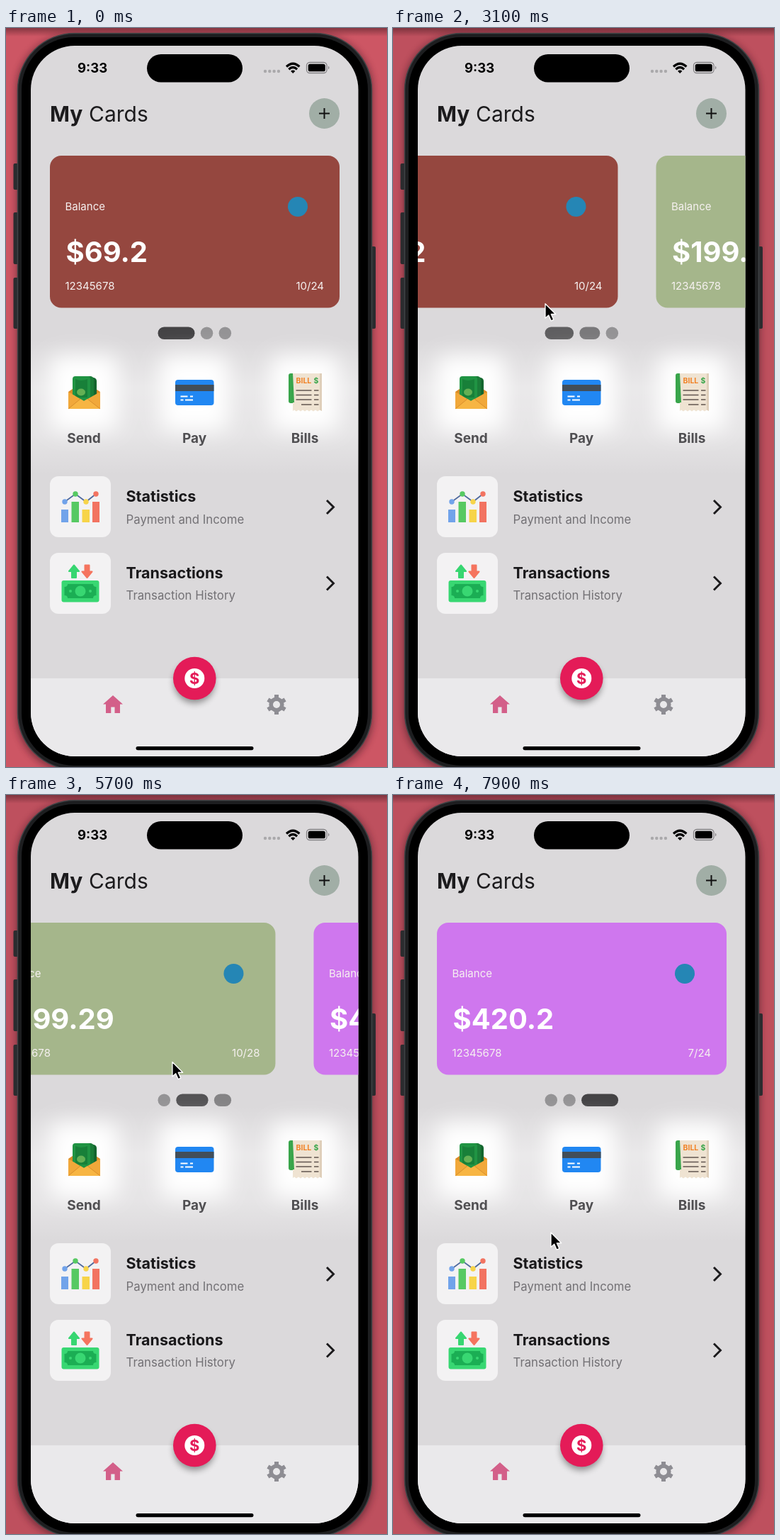
Write an HTML page that moves like this. It is 538 px wide and 1042 px high and loops after 8 s.

```html
<!DOCTYPE html>
<html lang="en">
<head>
<meta charset="utf-8">
<title>My Cards</title>
<style>
  html, body { margin: 0; width: 100%; height: 100%; overflow: hidden; background: #cd5664; }
  svg { display: block; width: 538px; height: 1042px; font-family: Inter, Roboto, sans-serif; }
  .bold { font-weight: 700; }
  .mid { text-anchor: middle; }
  .end { text-anchor: end; }
</style>
</head>
<body>
<svg viewBox="0 0 538 1042">
  <defs>
    <clipPath id="screen"><rect x="35" y="25" width="462.5" height="1002" rx="62"/></clipPath>
    <filter id="glow" x="-60%" y="-60%" width="220%" height="220%"><feGaussianBlur stdDeviation="15"/></filter>
    <filter id="soft" x="-30%" y="-30%" width="160%" height="160%"><feGaussianBlur stdDeviation="5"/></filter>
    <linearGradient id="band" x2="0" y2="1">
      <stop stop-color="#fff" stop-opacity="0"/><stop offset=".35" stop-color="#fff" stop-opacity=".4"/>
      <stop offset=".7" stop-color="#fff" stop-opacity=".3"/><stop offset="1" stop-color="#fff" stop-opacity="0"/>
    </linearGradient>
    <linearGradient id="edge" x2="0" y2="1">
      <stop stop-color="#4a1c24" stop-opacity=".55"/><stop offset="1" stop-color="#4a1c24" stop-opacity="0"/>
    </linearGradient>
  </defs>

  <rect width="538" height="1042" fill="#cd5664"/>
  <rect id="shade" width="538" height="1042" fill="#3a2028"/>
  <rect width="538" height="12" fill="url(#edge)"/>
  <rect x="14" y="9" width="505" height="1040" rx="78" fill="#401820" opacity=".5" filter="url(#soft)"/>

  <g fill="#2b2c2f">
    <rect x="10.500" y="191" width="8" height="37" rx="2"/>
    <rect x="10.500" y="260" width="8" height="73" rx="2"/>
    <rect x="10.500" y="352" width="8" height="72" rx="2"/>
    <rect x="514" y="308" width="8" height="116" rx="2"/>
  </g>
  <rect x="16.500" y="7.500" width="500" height="1038" rx="80" fill="#1d1e20" stroke="#404346" stroke-width="1.500"/>
  <rect x="22" y="13" width="489" height="1027" rx="74"/>

  <g clip-path="url(#screen)">
    <rect x="35" y="25" width="463" height="1002" fill="#dbd9db"/>

    <text class="bold" x="101" y="63" font-size="18.500" textLength="">9:33</text>
    <rect x="199" y="37" width="135" height="39.500" rx="19.750"/>
    <path d="M366 61h.01M372.300 61h.01M378.600 61h.01M384.900 61h.01" stroke="#aaa9ab" stroke-width="4.400" stroke-linecap="round"/>
    <g fill="none" stroke="#000" stroke-width="3.200">
      <path d="M396 54.500q9.200-8.600 18.400 0M399.300 58.200q5.900-5.400 11.800 0"/>
    </g>
    <path d="M402 60.800q3.200-2.600 6.400 0l-3.200 3.200z"/>
    <rect x="424.500" y="48.500" width="28.500" height="15" rx="4.500" fill="none" stroke="#858386" stroke-width="1.300"/>
    <rect x="426.700" y="50.700" width="24.100" height="10.600" rx="2.600"/>
    <path d="M455 53.500q3 2.500 0 5z" fill="#858386"/>

    <text y="132" font-size="30" fill="#1c1b1d"><tspan class="bold" x="62">My</tspan><tspan x="117">Cards</tspan></text>
    <circle cx="449.500" cy="120.500" r="21.500" fill="#a1aea6"/>
    <path d="M442 120.500h15M449.500 113v15" stroke="#111" stroke-width="2"/>

    <g id="cards"></g>
    <g id="dots"></g>

    <rect x="35" y="440" width="463" height="190" fill="url(#band)"/>
    <g fill="#fff" filter="url(#glow)">
      <rect x="62" y="462" width="96" height="106" rx="14"/>
      <rect x="218" y="462" width="96" height="106" rx="14"/>
      <rect x="374" y="462" width="96" height="106" rx="14"/>
    </g>

    <!-- Send -->
    <path d="M88 513l22-15 23 15v24H88z" fill="#d98b27"/>
    <path d="M108 491l16 2q4 1 4 5v20l-16 6z" fill="#14662f"/>
    <path d="M102 491h18q4 1 4 5v24l-16 6z" fill="#1b7d39"/>
    <rect x="94" y="491" width="25" height="36" rx="4" fill="#209443"/>
    <path d="M98 495q8 4 17 0v26H98z" fill="#188039"/>
    <ellipse cx="106" cy="513.500" rx="6" ry="5" fill="#64b054"/>
    <path d="M88 513l22 13 23-13v24H88z" fill="#f1a83a"/>
    <path d="M88 537l17-14 5 3 5-3 18 14z" fill="#f7b543"/>
    <path d="M88 537l17-14M133 537l-18-14" stroke="#d98f2c"/>

    <!-- Pay -->
    <rect x="239" y="496" width="54.500" height="36" rx="4" fill="#2187f2"/>
    <path d="M239 503h54.500v9H239z" fill="#424e59"/>
    <path d="M246.500 519.500h10M260 519.500h4M246.500 524.500h4M253 524.500h11" stroke="#fff" stroke-width="1.800"/>

    <!-- Bills -->
    <path d="M402 487h8v42h-8q-3 0-3-3v-36q0-3 3-3z" fill="#39a54b"/>
    <path d="M405 487h41v53l-3-1.500-3 2-3-2-3 2-3-2-3 2-3-2-3 2-3-2-3 2-3-2-3 2-3-2-2 1.500V528h2z" fill="#efe3d2"/>
    <path d="M443 487h3v53l-3-1.500z" fill="#dfcfba"/>
    <text class="bold" y="501" font-size="10.500" fill="#f18327"><tspan x="409.500">BILL</tspan><tspan x="434.500" fill="#39a54b">$</tspan></text>
    <path d="M409.500 511h22M435 511h6.500M409.500 517.500h22M435 517.500h6.500M409.500 524h22M435 524h6.500M417 531h14.500M435 531h6.500" stroke="#62554f" stroke-width="1.600"/>

    <g class="bold mid" font-size="19" fill="#504f52">
      <text x="110" y="585">Send</text><text x="266" y="585">Pay</text><text x="422" y="585">Bills</text>
    </g>

    <g fill="#f3f2f3">
      <rect x="62" y="632" width="86" height="86" rx="12"/>
      <rect x="62" y="740" width="86" height="86" rx="12"/>
    </g>
    <g class="bold" font-size="21.500" fill="#19181a">
      <text x="169.500" y="668">Statistics</text><text x="169.500" y="776">Transactions</text>
    </g>
    <g font-size="16.800" fill="#737175">
      <text x="169.500" y="698.500">Payment and Income</text><text x="169.500" y="806">Transaction History</text>
    </g>
    <path d="M453 666l9.500 9.500-9.500 9.500M453 773.500l9.500 9.500-9.500 9.500" fill="none" stroke="#1b1a1c" stroke-width="2.900"/>

    <!-- Statistics -->
    <path d="M83 668l15-11 15 11 14-11" fill="none" stroke="#4f699d" stroke-width="1.800"/>
    <g fill="#71a3ea"><path d="M78 679h10v18H78z"/><circle cx="83" cy="668" r="3.700"/></g>
    <g fill="#56c962"><path d="M92.500 668h10.500v29H92.500z"/><circle cx="98" cy="657" r="3.700"/></g>
    <g fill="#f7d449"><path d="M107.500 679H118v18h-10.500z"/><circle cx="113" cy="668" r="3.700"/></g>
    <g fill="#f27361"><path d="M122 668h10v29h-10z"/><circle cx="127" cy="657" r="3.700"/></g>

    <!-- Transactions -->
    <g stroke-width="2" stroke-linejoin="round">
      <path d="M96 757.500l7 8.500h-4v9h-6v-9h-4z" fill="#37d671" stroke="#37d671"/>
      <path d="M114.500 775l-7-8.500h4v-9h6v9h4z" fill="#f5745f" stroke="#f5745f"/>
    </g>
    <rect x="78.500" y="779" width="53" height="30.500" rx="3" fill="#38d772"/>
    <path d="M87 784h36q0 4 4.500 4v12q-4.500 0-4.500 4H87q0-4-4.500-4v-12q4.500 0 4.500-4z" fill="#1bae54"/>
    <circle cx="105" cy="794" r="7.500" fill="#38d772"/>
    <path d="M91 794h.01M119 794h.01" stroke="#38d772" stroke-width="4" stroke-linecap="round"/>

    <rect x="35" y="917" width="463" height="110" fill="#eae9eb"/>
    <circle cx="266" cy="923" r="29" opacity=".4" filter="url(#soft)"/>
    <circle cx="266.300" cy="917" r="30.300" fill="#e41b58"/>
    <circle cx="266.300" cy="917" r="14" fill="#fff"/>
    <text class="bold mid" x="266.300" y="925" font-size="22" fill="#e41b58">$</text>
    <path d="M151 941l14 12.500h-4V966h-7.500v-8.500h-5.200V966H141v-12.500h-4z" fill="#d35f89"/>
    <g fill="none" stroke="#8e8d93">
      <circle cx="382" cy="954" r="7.800" stroke-width="5.600"/>
      <path id="teeth" stroke-width="6"/>
    </g>
    <rect x="183.500" y="1013" width="166" height="5.200" rx="2.600"/>
  </g>

  <path id="cursor" d="M0 0v20.500l4.700-4.300 3.500 8 3.600-1.600-3.500-7.800h6.400z" stroke="#fff" stroke-width="1.300" stroke-linejoin="round"/>
</svg>
<script>
const LOOP = 8000, PITCH = 463;
const $ = id => document.getElementById(id);
const clamp = v => Math.max(0, Math.min(1, v));
const mix = (a, b, k) => a + (b - a) * k;

const cards = [
  ['#95473f', '$69.2', '10/24'],
  ['#a5b68b', '$199.29', '10/28'],
  ['#cf77ee', '$420.2', '7/24']
];
$('cards').innerHTML = cards.map(([fill, amount, date], i) => `
  <g transform="translate(${i * PITCH})" fill="#f6f1f0" font-size="15">
    <rect x="62" y="180" width="409" height="214.500" rx="16" fill="${fill}"/>
    <text x="83.500" y="257">Balance</text>
    <circle cx="412" cy="252" r="14" fill="#2586b5"/>
    <text class="bold" x="84.500" y="330" font-size="40" fill="#fff">${amount}</text>
    <text x="83.500" y="369">12345678</text>
    <text class="end" x="449" y="369">${date}</text>
  </g>`).join('');
$('dots').innerHTML = '<rect y="421.500" height="17.500" rx="8.750"/>'.repeat(3);
const dots = [...$('dots').children];

let teeth = '';
for (let i = 0; i < 6; i++) {
  const a = i * Math.PI / 3 + Math.PI / 6, c = Math.cos(a), s = Math.sin(a);
  teeth += `M${382 + 8 * c} ${954 + 8 * s}L${382 + 14 * c} ${954 + 14 * s}`;
}
$('teeth').setAttribute('d', teeth);

// Pointer stops: time, x, y
const stops = [
  [1900, 545, 400], [2350, 416, 345], [2700, 416, 345], [3380, 98.5, 414],
  [4200, 98.5, 414], [4900, 383, 343], [5350, 383, 343], [6100, 55.5, 417],
  [6700, 55.5, 417], [7500, 223, 617], [LOOP, 223, 617]
];
function pointer(t) {
  const i = Math.max(1, stops.findIndex(s => s[0] > t));
  const [t0, x0, y0] = stops[i - 1], [t1, x1, y1] = stops[i];
  const u = clamp((t - t0) / (t1 - t0)), k = u * u * (3 - 2 * u);
  return [mix(x0, x1, k), mix(y0, y1, k)];
}

// A swipe follows the pointer, then settles like a damped spring
function swipe(t, press, release, grabX) {
  if (t < press) return 0;
  const drag = clamp((grabX - pointer(Math.min(t, release))[0]) / PITCH);
  const w = Math.max(0, t - release) * .0141;
  return 1 - (1 - drag) * (1 + w) * Math.exp(-w);
}

function draw(t) {
  const page = swipe(t, 2700, 3380, 368.5) + swipe(t, 5350, 6100, 325.5);
  $('cards').setAttribute('transform', `translate(${-page * PITCH})`);
  let x = 214.5;
  dots.forEach((dot, i) => {
    const on = clamp(1 - Math.abs(page - i)), width = 17.5 + 34.5 * on, g = mix(148, 68, on);
    dot.setAttribute('x', x);
    dot.setAttribute('width', width);
    dot.setAttribute('fill', `rgb(${g},${g - 1},${g + 1})`);
    x += width + 8.3;
  });
  const [px, py] = pointer(t);
  $('cursor').setAttribute('transform', `translate(${px} ${py})`);
  $('cursor').setAttribute('visibility', t < 1900 ? 'hidden' : 'visible');
  $('shade').setAttribute('opacity', t < 3000 ? 0 : .1);
}

function frame() {
  draw(performance.now() % LOOP);
  requestAnimationFrame(frame);
}
frame();
</script>
</body>
</html>
```
